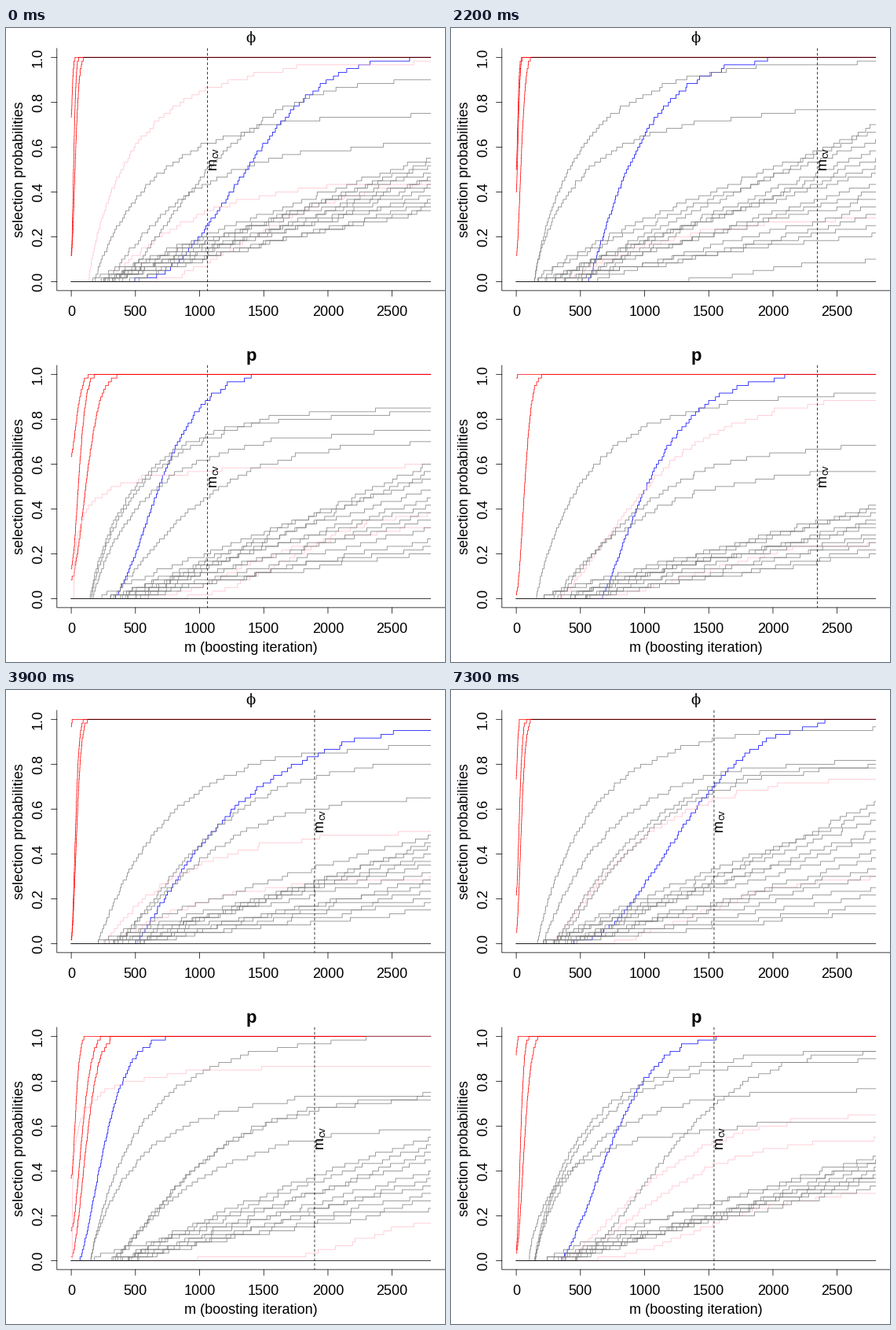
A matplotlib script that plays this animation: 559x806 px, repeating every 8 s.

```python
import numpy as np
import matplotlib.pyplot as plt
from matplotlib.animation import FuncAnimation

W, H, DPI = 559, 806, 64
PX = 72 / DPI                        # one pixel in points
ROW = 14.4                           # height of one margin line
LEFT, TOP, FLOOR = 4.5 * ROW, 1.8 * ROW, H / 2 - 4.8 * ROW
X_SPAN, Y_SPAN = (W - LEFT) / 1.08, (FLOOR - TOP) / 1.08
END = 2800                           # last boosting iteration
COUNTS = 60                          # probabilities are multiples of 1 / 60
COLORS = {"blue": "#0000ff", "red": "#ff0000", "pink": "#ffc0cb", "gray": "#808080"}
PHI, P = 0, H / 2                    # vertical offsets of the two panels

HOLDS = [5, 17, 17, 17, 17, 7]       # tenths of a second per run
CV_STOP = [1061, 2789, 2346, 1896, 1131, 1541]

fig = plt.figure(figsize=(W / DPI, H / DPI), dpi=DPI, facecolor="white")
ax = fig.add_axes([0, 0, 1, 1])
ax.set(xlim=(0, W), ylim=(H, 0))
ax.axis("off")
runs = [[] for _ in HOLDS]


def px(iteration):
    return LEFT + 0.04 * X_SPAN + X_SPAN / END * np.asarray(iteration, float)


def py(probability, offset):
    return offset + FLOOR - Y_SPAN * (0.04 + np.asarray(probability, float))


def line(x, y, color="black", z=0, **style):
    artist, = ax.plot(x, y, color=color, lw=0.75 * PX, zorder=z, snap=False, **style)
    return artist


def label(x, y, s, size=18, ha="center", **style):
    style = {"family": "Liberation Sans", **style}
    return ax.text(x, y, s, fontsize=size * PX, ha=ha, va="baseline",
                   rotation_mode="anchor", zorder=8, **style)


def draw_axes(offset):
    bottom = offset + FLOOR
    line([LEFT, LEFT, W], [offset + TOP, bottom, bottom])
    for p in np.arange(0, 1.1, 0.2):
        y = py(p, offset)
        line([LEFT - ROW / 2, LEFT], [y, y])
        label(LEFT - 1.3 * ROW, y, f"{p:.1f}", rotation=90)
    for m in range(0, 2501, 500):
        line([px(m)] * 2, [bottom, bottom + ROW / 2])
        label(px(m), bottom + 2.2 * ROW, str(m))
    label(LEFT - 3 * ROW, py(0.5, offset), "selection probabilities", rotation=90)
    line(px([0, END]), [py(0, offset)] * 2, z=5)


def saturating(start, half, last, low, high):
    """Step times of a count that is halfway up at `half` and full at `last`."""
    n = high - low
    q = np.arange(1, n + 1) / (n + 0.5)
    shape = np.log(np.log2(2 * n + 1)) / np.log((last - start) / (half - start))
    return start + (half - start) * (-np.log2(1 - q)) ** (1 / shape)


def steady(start, bend, high):
    """Step times of a nearly even climb up to the last iteration."""
    return start + (END - start) * (np.arange(1, high + 1) / high) ** bend


def panel(run, offset, red, blue, pink, gray, low):
    """red: (first %, full at), blue: (start, half, full), pink and gray: (half, last %),
    low: (number, smallest and largest last %) of the slow gray curves."""
    rng = np.random.default_rng(10 * run + (offset == P))

    def count(percent):
        return round(percent * COUNTS / 100)

    def draw(name, times, first=0, start=0):
        times = times - rng.random(len(times)) * np.diff(times, prepend=start)
        times = times[times < END]
        steps = np.r_[first, first + np.arange(1, len(times) + 1), first + len(times)]
        runs[run].append(line(px(np.r_[0, times, END]), py(steps / COUNTS, offset),
                              COLORS[name], 1 + list(COLORS).index(name) / 10,
                              drawstyle="steps-post"))

    for percent, full in red:
        first = count(percent)
        draw("red", saturating(0, full / 3, full, first, COUNTS), first)
    draw("blue", saturating(*blue, 0, COUNTS), start=blue[0])
    for name, curves in (("pink", pink), ("gray", gray)):
        for half, percent in curves:
            start = 0.35 * half
            draw(name, saturating(start, half, END, 0, count(percent)), start=start)
    for percent in np.linspace(*low[1:], low[0]):
        start = rng.uniform(150, 550)
        draw("gray", steady(start, rng.uniform(0.95, 1.3), count(percent)), start=start)

    if offset == PHI:
        full = max(full for _, full in red)
        runs[run].append(line(px([full, END]), [py(1, offset)] * 2, z=5))
    x = float(px(CV_STOP[run]))
    runs[run] += [
        line([x, x], [offset + TOP, offset + FLOOR], z=6, dashes=(4, 4), dash_capstyle="round"),
        label(x + 11, py(0.5, offset), "m", ha="left", rotation=90),
        label(x + 14, py(0.5, offset) - 15, "cv", 12.6, ha="left", rotation=90),
    ]


draw_axes(PHI)
draw_axes(P)
center = (LEFT + W) / 2
label(center, 18, "\u03d5", family="DejaVu Serif")
label(center, 423.5, "p", 22, weight="bold")
label(center, P + FLOOR + 3.9 * ROW, "m (boosting iteration)")

panel(0, PHI, red=[(73, 30), (12, 60), (12, 100)], blue=(490, 1370, 2700),
      pink=[(390, 98), (780, 45), (1500, 43)],
      gray=[(520, 75), (1000, 90), (750, 62)], low=(13, 31, 55))
panel(0, P, red=[(63, 140), (13, 190), (8, 370)], blue=(320, 690, 1560),
      pink=[(60, 60), (1450, 32), (1750, 39)],
      gray=[(420, 85), (440, 84), (480, 75), (850, 70)], low=(12, 20, 60))

panel(1, PHI, red=[(93, 30), (7, 100), (0, 330)], blue=(900, 1900, 3900),
      pink=[(1200, 27), (1700, 22)],
      gray=[(520, 82), (820, 84), (860, 70)], low=(14, 12, 60))
panel(1, P, red=[(40, 60), (5, 160), (0, 420)], blue=(250, 630, 2900),
      pink=[(10, 84), (220, 70)],
      gray=[(480, 92), (230, 68), (230, 48), (1780, 52)], low=(10, 15, 37))

panel(2, PHI, red=[(50, 40), (40, 50), (12, 120)], blue=(560, 870, 2220),
      pink=[(950, 28)],
      gray=[(410, 98), (400, 77), (2050, 10)], low=(14, 22, 70))
panel(2, P, red=[(98, 40), (2, 200)], blue=(660, 1020, 2330),
      pink=[(940, 89), (1500, 25)],
      gray=[(450, 92), (850, 68), (780, 57)], low=(11, 20, 42))

panel(3, PHI, red=[(97, 10), (2, 100), (2, 130)], blue=(500, 1110, 3800),
      pink=[(700, 50), (850, 30)],
      gray=[(590, 89), (940, 80), (920, 65)], low=(13, 15, 48))
panel(3, P, red=[(37, 110), (13, 260), (2, 350)], blue=(60, 255, 790),
      pink=[(20, 87), (2230, 17)],
      gray=[(440, 100), (430, 75), (900, 73), (880, 71), (850, 58)], low=(10, 23, 55))

panel(4, PHI, red=[(80, 20), (20, 60), (3, 160)], blue=(590, 1770, 3300),
      pink=[(750, 45), (1650, 25)],
      gray=[(370, 95), (470, 90), (730, 80), (850, 87), (950, 77)], low=(11, 28, 65))
panel(4, P, red=[(40, 50), (40, 110), (7, 260)], blue=(300, 555, 1800),
      pink=[(560, 44), (1900, 15)],
      gray=[(770, 98), (750, 87), (620, 65)], low=(11, 27, 63))

panel(5, PHI, red=[(73, 30), (22, 80), (5, 120)], blue=(450, 1280, 2650),
      pink=[(800, 73), (1530, 30)],
      gray=[(470, 97), (590, 82), (800, 80), (850, 78)], low=(13, 13, 63))
panel(5, P, red=[(92, 20), (5, 100), (3, 190)], blue=(310, 730, 1630),
      pink=[(1000, 65), (1100, 55), (1500, 30)],
      gray=[(410, 93), (430, 90), (420, 77), (290, 62), (1180, 93)], low=(9, 33, 47))

schedule = np.repeat(np.arange(len(HOLDS)), HOLDS)


def update(frame):
    for run, artists in enumerate(runs):
        for artist in artists:
            artist.set_visible(run == schedule[frame])
    return []


anim = FuncAnimation(fig, update, frames=len(schedule), interval=100,
                     repeat=True, repeat_delay=0, blit=False)
plt.show()
```
